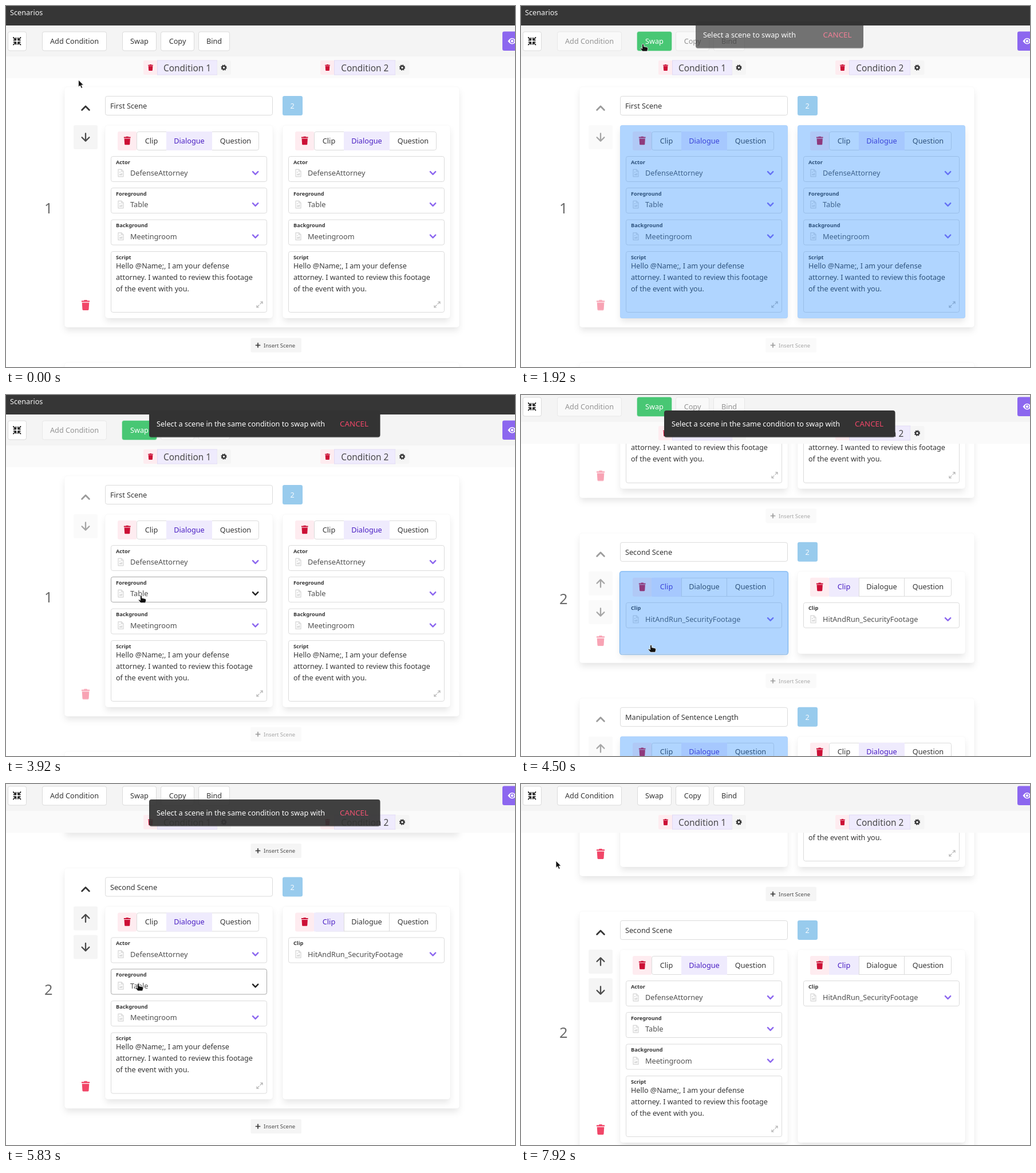
An HTML page that plays this animation: 889 by 630 pixels, repeating every 8000 ms.

```html
<!DOCTYPE html>
<html lang="en">
<head>
<meta charset="utf-8">
<title>Scene editor</title>
<style>
  html, body { margin: 0; width: 100%; height: 100%; overflow: hidden; background: #fff; }
  svg { display: block; font: 12.7px "Noto Sans", sans-serif; fill: #363636; }
  .mid { text-anchor: middle; }
  .label { font-size: 9.2px; font-weight: 700; }
  .line { fill: none; stroke-linecap: round; stroke-linejoin: round; }
</style>
</head>
<body>
<svg width="889" height="630" viewBox="0 0 889 630">
  <defs><filter id="soft" x="-10%" y="-20%" width="120%" height="140%"><feGaussianBlur stdDeviation="6"/></filter></defs>
  <g id="page"></g>
  <g id="bars"></g>
  <g id="toasts"></g>
  <path id="arrow" d="M0,0V12.4L2.9,9.8L5,14.6L7.2,13.6L5.2,9H9Z" fill="#111" stroke="#fff" stroke-width=".8"/>
  <path id="hand" d="M-1.4,1Q0,-.8 1.4,1V4.6L7,5.8Q9,6.5 8.6,8.6L7.6,13H-.8L-4.6,8.4Q-4.8,6.6 -3,7.2L-1.4,8.6Z" fill="#111" stroke="#fff" stroke-width=".8"/>
</svg>
<script>
const LOOP = 8000, STEP = 1000 / 12, STICKY = 41, PANEL_GAP = 310;
const PURPLE = '#8c67ef', LILAC = '#efebfd', ROSE = '#feecf0', RED = '#cc0f35', BORDER = '#dbdbdb', GREY = '#f5f5f5';
const $ = id => document.getElementById(id);

// --- drawing helpers ---
const rect = (x, y, w, h, fill, more = '') =>
  `<rect x="${x}" y="${y}" width="${w}" height="${h}" fill="${fill}" ${more}/>`;
const text = (x, y, s, more = '') => `<text x="${x}" y="${y}" ${more}>${s}</text>`;
const group = (x, y, body, more = '') => `<g transform="translate(${x} ${y})" ${more}>${body}</g>`;
const line = (d, color, width) => `<path class="line" d="${d}" stroke="${color}" stroke-width="${width}"/>`;
const box = (x, y, w, h, stroke = BORDER, fill = '#fff') =>
  rect(x + .5, y + .5, w, h, fill, `rx="3.3" stroke="${stroke}"`);
const dim = on => on ? 'opacity=".5"' : '';

const trash = (x, y, scale, color) => group(x, y,
  `<path transform="scale(${scale})" fill="${color}" d="M-6,-6.6H-2.6L-2,-7.6H2L2.6,-6.6H6V-4.6H-6ZM-5.3,-3.7H5.3L4.7,6.4Q4.6,7.6 3.5,7.6H-3.5Q-4.6,7.6 -4.7,6.4Z"/>`);
const gear = (x, y) => group(x, y,
  `<circle r="2.9" fill="none" stroke="#363636" stroke-width="2.4"/>
   <circle r="4.4" fill="none" stroke="#363636" stroke-width="1.6" stroke-dasharray="1.73 1.726"/>`);
const plus = (x, y) => line(`M${x - 3.6},${y}h7.2M${x},${y - 3.6}v7.2`, '#363636', 1.7);
const fileIcon = (x, y) => group(x, y,
  line('M-4.5,-6.3H1.2L4.5,-3V6.3H-4.5ZM1,-6V-2.6H4.4', BORDER, 1.4) +
  `<path d="M-2.6,4V2L-1,.8L0,1.8L2,-.4L2.8,.6V4Z" fill="${BORDER}"/><circle cx="-1.6" cy="-1.4" r="1.1" fill="${BORDER}"/>`);
const expandIcon = (x, y) => group(x, y,
  line('M1,-1L5,-5M1.6,-5H5V-1.6M-1,1L-5,5M-1.6,5H-5V1.6', '#b5b5b5', 1.2));

function shadowed(x, y, w, h) {
  return rect(x + 1.7, y + 8.4, w - 3.4, h - 3.4, '#0a0a0a', 'fill-opacity=".1" filter="url(#soft)"') +
    rect(x, y, w, h, '#fff', 'rx="5" stroke="#0a0a0a" stroke-opacity=".025"');
}

// --- scene cards ---
const TITLES = ['First Scene', 'Second Scene', 'Manipulation of Sentence Length'];
const SCRIPT = ['Hello @Name;, I am your defense', 'attorney. I wanted to review this footage', 'of the event with you.'];
const TABS = [['Clip', 228, 280], ['Dialogue', 280, 360], ['Question', 360, 442]];
const FIELDS = {
  Dialogue: [['Actor', 'DefenseAttorney', 121], ['Foreground', 'Table', 176], ['Background', 'Meetingroom', 231.5], ['Script', null, 287]],
  Clip: [['Clip', 'HitAndRun_SecurityFootage', 121]]
};
const fieldHeight = value => value ? 44 : 106;

function layout(swapped) {
  const kinds = swapped
    ? [['Clip', 'Dialogue'], ['Dialogue', 'Clip'], ['Dialogue', 'Dialogue']]
    : [['Dialogue', 'Dialogue'], ['Clip', 'Clip'], ['Dialogue', 'Dialogue']];
  let top = 141;
  return kinds.map((panels, index) => {
    const height = panels.includes('Dialogue') ? 420 : 227;
    const scene = { index, panels, top, height };
    top += height + 61;
    return scene;
  });
}

const pickable = (mode, scene, column) => mode === 1 || (mode === 2 && scene > 0 && column === 0);

function drawField([label, value, y], hovered) {
  const body = value
    ? fileIcon(200.5, y + 29.5) + text(217, y + 34, value, 'fill="#505050"') +
      line(`M431,${y + 27.2}l4.6,4.6l4.6,-4.6`, hovered ? '#222' : PURPLE, 2.5)
    : SCRIPT.map((s, i) => text(192, y + 29.6 + i * 20, s, 'font-size="12.6"')).join('') + expandIcon(443, y + 93);
  return box(183, y, 272, fieldHeight(value), hovered ? '#a8a8a8' : BORDER) +
    text(192, y + 13.6, label, 'class="label"') + body;
}

function drawPanel(kind, height, overlay, hover) {
  let out = shadowed(173, 67, 293, height) + rect(195, 78, 33.5, 33, ROSE, 'rx="3"') + trash(211.7, 94, .97, RED);
  out += box(228, 78, 213, 32) + line('M280.5,79V110M359.5,79V110', BORDER, 1);
  for (const [name, x, end] of TABS) {
    const active = name === kind;
    if (active) out += rect(x, 78, end - x, 33, LILAC);
    out += text((x + end) / 2, 98.6, name, `class="mid" ${active ? 'fill="#4a1fc4"' : ''}`);
  }
  out += FIELDS[kind].map(f => drawField(f, hover && hover.field === f[0])).join('');
  if (overlay) {
    out += rect(173, 67, 293, height, '#1e87ff', 'fill-opacity=".35" rx="4"');
    if (hover) out += rect(172.5, 67, 294, height + 1, 'none', 'rx="4" stroke="#5aa4ee" stroke-opacity=".7" stroke-width="1.4"');
  }
  return out;
}

function arrowButton(y, up) {
  const s = up ? -1 : 1;
  return rect(118, y - 21, 42, 42, GREY, 'rx="3"') +
    line(`M139,${y - 6.5 * s}V${y + 6.5 * s}M132.6,${y + .2 * s}L139,${y + 6.6 * s}L145.4,${y + .2 * s}`, '#4a4a4a', 2.3);
}

function drawScene({ index, panels, top, height }, mode, hover) {
  const tall = height > 300;
  const ups = index > 0, downs = index < 2;
  const controls = line('M132.6,40.5L139,34.1L145.4,40.5', '#363636', 2.8) +
    (ups ? arrowButton(88, true) : '') + (downs ? arrowButton(ups ? 138 : 88, false) : '') +
    trash(139, tall ? 381 : 188, 1.18, '#f14668');
  const insert = rect(427.5, height + 18.5, 88.5, 25, GREY, 'rx="2"') + plus(440, height + 31) +
    text(450, height + 34.6, 'Insert Scene', 'font-size="9.5" fill="#4a4a4a"');
  const columns = panels.map((kind, c) => {
    const mine = hover && hover.scene === index && hover.column === c ? hover : null;
    return group(c * PANEL_GAP, 0, drawPanel(kind, height - 83, pickable(mode, index, c), mine));
  }).join('');
  return group(0, top,
    text(74.3, height / 2 + 11, index + 1, 'class="mid" font-size="25.4" fill="#6b6b6b"') +
    shadowed(102, 0, 690, height) + `<g ${dim(mode)}>${controls}${insert}</g>` +
    box(173, 16, 292, 33) + text(182, 38, TITLES[index]) +
    rect(483, 16, 35, 34, '#98cbed', 'rx="3.3"') + text(500.2, 38, 2, 'class="mid" fill="#fff" fill-opacity=".9"') + columns);
}

// --- sticky bars and messages ---
function drawBars(mode, swapHover) {
  const button = (x, end, name) => box(x, 44.5, end - x - 1, 33, name === 'Swap' && swapHover ? '#a0a0a0' : BORDER) +
    text((x + end) / 2, 66, name, 'class="mid"');
  const faded = (...args) => `<g ${dim(mode)}>${button(...args)}</g>`;
  const swap = mode
    ? rect(203, 45, 60, 33, '#48c774', 'rx="3.3" stroke="#48c774" stroke-opacity=".3" stroke-width="2"') +
      text(233, 66, 'Swap', 'class="mid" fill="#fff"')
    : button(203, 263, 'Swap');
  const inward = [0, 90, 180, 270].map(a =>
    `<g transform="rotate(${a})">${line('M1.8,-5.6V-1.8H5.6M2,-2L6.3,-6.3', '#222', 1.8)}</g>`).join('');
  const tag = (x, end, n) => rect(x, 95, 24.5, 25, ROSE, 'rx="2"') + trash(x + 12.5, 107.5, .72, RED) +
    rect(x + 24.5, 95, end - x - 49, 25, LILAC, 'stroke="#dcd5f3" stroke-width=".8"') +
    text((x + end) / 2, 113.6, 'Condition ' + n, 'class="mid" font-size="15.4" fill="#4a4a4a"') +
    rect(end - 24.5, 95, 24.5, 25, GREY, 'rx="2"') + gear(end - 12.5, 107.5);
  return rect(0, 34, 889, 54, '#f4f4f4') + rect(0, 88, 889, 38, '#fafafa') + rect(0, 0, 889, 34, '#363636') +
    text(7, 16, 'Scenarios', 'fill="#f5f5f5"') +
    box(3, 44.5, 32, 33) + group(19.2, 61.3, inward) +
    faded(63, 176, 'Add Condition') + swap + faded(270, 329, 'Copy') + faded(336, 391, 'Bind') +
    rect(867, 44.5, 40, 33.5, PURPLE, 'rx="3.3"') +
    `<path d="M876.5,61.3Q884,50.8 891.5,61.3Q884,71.8 876.5,61.3Z" fill="#fff"/>
     <circle cx="884" cy="61.3" r="3.7" fill="${PURPLE}"/><circle cx="884" cy="61.3" r="2.2" fill="#fff"/>` +
    tag(240, 393, 1) + tag(549, 704.5, 2);
}

const toast = (id, x, end, message) => `<g id="${id}">` +
  rect(x, 29, end - x, 46, '#000', 'rx="4" fill-opacity=".12"') + rect(x, 27, end - x, 46.5, '#333', 'rx="4"') +
  text(x + 13, 55, message, 'fill="#fff"') +
  text(end - 45.5, 55.2, 'CANCEL', 'class="mid" font-size="13.4" fill="#f14668"') + '</g>';
$('toasts').innerHTML = toast('pickAny', 305, 598, 'Select a scene to swap with') +
  toast('pickSame', 250, 653.5, 'Select a scene in the same condition to swap with');

// --- motion: [time, value, ...] keys, linear between ---
const SCROLL = [[4250, 0], [4333, 150], [4500, 381], [4667, 430], [5083, 473], [5250, 474], [5417, 475.5], [7834, 475.5], [7916, 400]];
const POINTER = [[583, 126.5, 129], [1250, 213, 67], [1417, 213, 67], [1500, 213, 66], [1917, 213, 66], [2583, 237, 300],
  [2916, 239, 321], [3834, 239, 321], [4167, 227, 436], [5250, 227, 436], [5667, 231, 348], [6500, 231, 348],
  [6916, 232, 222], [7250, 46, -30], [7750, 61, 134]];
const PICK_ANY = [[1750, 0], [2000, 1], [3417, 1], [3667, 0]];
const PICK_SAME = [[3417, 0], [3750, 1], [5750, 1], [5833, .93], [5917, .93], [6000, 0]];

function along(keys, t) {
  const next = keys.findIndex(k => k[0] > t);
  if (next === 0) return keys[0].slice(1);
  if (next < 0) return keys[keys.length - 1].slice(1);
  const a = keys[next - 1], b = keys[next], f = (t - a[0]) / (b[0] - a[0]);
  return a.slice(1).map((v, i) => v + (b[i + 1] - v) * f);
}

function findHover(scenes, mode, x, y) {
  for (const { index, panels, top, height } of scenes) {
    const column = x >= 173 && x <= 466 ? 0 : x >= 483 && x <= 776 ? 1 : -1;
    const rel = y - top;
    if (column < 0 || rel < 67 || rel > height - 16) continue;
    if (pickable(mode, index, column)) return { scene: index, column, hand: true };
    const field = FIELDS[panels[column]].find(f => rel >= f[2] && rel <= f[2] + fieldHeight(f[1]));
    return { scene: index, column, field: field && field[0], hand: !!field || (rel > 78 && rel < 111) };
  }
  return null;
}

const drawn = {};
function refresh(id, key, draw) {
  if (drawn[id] === key) return;
  drawn[id] = key;
  $(id).innerHTML = draw();
}

function render(time) {
  const t = Math.floor((time % LOOP + 4) / STEP) * STEP + .5;
  const mode = t < 1833 || t >= 5750 ? 0 : t < 3500 ? 1 : 2;
  const swapped = t >= 5750;
  const [scroll] = along(SCROLL, t);
  const [x, y] = along(POINTER, t);
  const scenes = layout(swapped);
  const shown = t < 6920 || t >= 7330;
  const barShift = Math.min(scroll, STICKY);
  const hover = shown && y > 126 - barShift ? findHover(scenes, mode, x, y + scroll) : null;
  const onSwap = x >= 203 && x <= 263 && y + barShift >= 45 && y + barShift <= 78;

  refresh('page', JSON.stringify([mode, swapped, hover]), () => scenes.map(s => drawScene(s, mode, hover)).join(''));
  refresh('bars', mode + '/' + onSwap, () => drawBars(mode, onSwap));
  $('page').setAttribute('transform', `translate(0 ${-scroll})`);
  $('bars').setAttribute('transform', `translate(0 ${-barShift})`);
  $('pickAny').setAttribute('opacity', along(PICK_ANY, t)[0]);
  $('pickSame').setAttribute('opacity', along(PICK_SAME, t)[0]);

  const hand = onSwap || !!(hover && hover.hand);
  for (const [id, on, dx] of [['hand', hand, 0], ['arrow', !hand, t > 5000 && t < 5700 ? -1.5 : 0]]) {
    $(id).setAttribute('transform', `translate(${x + dx} ${y})`);
    $(id).setAttribute('visibility', on && shown ? 'visible' : 'hidden');
  }
}

const start = performance.now();
function tick() {
  render(performance.now() - start);
  requestAnimationFrame(tick);
}
tick();
</script>
</body>
</html>
```
